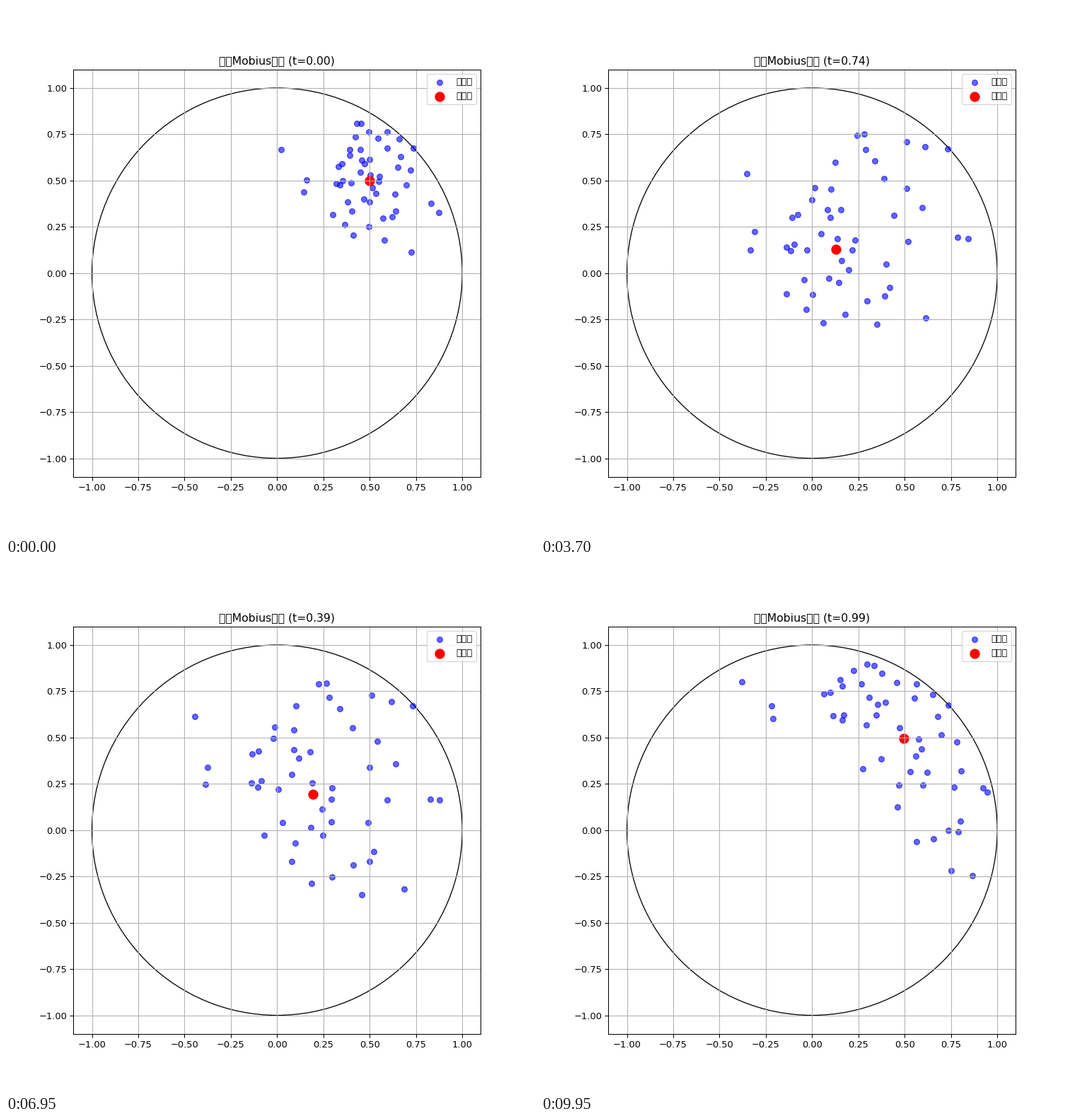
These frames come from a looping animation (748 by 748 pixels, 10 s). A matplotlib script:

```python
import numpy as np
import matplotlib.pyplot as plt
from matplotlib.animation import FuncAnimation

plt.rcParams["font.family"] = ["DejaVu Sans"]

STEPS = 100          # frames per half of the loop
CENTER = 0.5 + 0.5j

# Cloud after its center has been carried to the origin
SPREAD = np.array([
    (-.486, .494), (-.476, .125), (-.500, .014), (-.300, .017), (-.276, -.005),
    (-.253, .033), (-.179, -.005), (-.264, .202), (-.230, .222), (-.141, .314),
    (-.118, .388), (-.022, .380), (.021, .551), (.176, .721), (.222, .729),
    (.217, .633), (.266, .564), (.315, .452), (.478, .692), (.593, .670),
    (.730, .671), (.454, .396), (.548, .282), (.370, .222), (.456, .063),
    (.767, .129), (.835, .135), (.314, -.084), (.339, -.220), (.310, -.274),
    (.198, -.309), (.268, -.433), (.573, -.364), (.065, -.386), (-.062, -.436),
    (-.169, -.359), (-.140, -.271), (-.292, -.261), (-.192, -.184), (-.045, -.179),
    (.021, -.205), (.079, -.128), (.034, -.072), (.100, -.006), (.116, .055),
    (.008, .064), (-.092, .095), (-.049, .249), (-.034, .199), (.033, .250),
]) @ np.array([1, 1j])


def mobius_add(z, b):
    return (z + b) / (1 + np.conj(z) * b)


def mobius_unadd(w, b):
    """Solve mobius_add(z, -b) = w for z."""
    gw, gb = 1 / (1 - abs(w) ** 2), 1 / (1 - abs(b) ** 2)
    return (gw * w + gb * b) / (gw + gb - 1)


def lerp(p, q, t):
    return (1 - t) * p + t * q


def xy(z):
    z = np.atleast_1d(z)
    return np.column_stack([z.real, z.imag])


START = mobius_unadd(SPREAD, CENTER)
END = mobius_add(SPREAD, CENTER)

fig, ax = plt.subplots(figsize=(8, 8), dpi=93.5)
ax.set_xlim(-1.1, 1.1)
ax.set_ylim(-1.1, 1.1)
ax.set_aspect("equal")
ax.grid(True)
ax.add_patch(plt.Circle((0, 0), 1, fill=False, color="black"))

cloud = ax.scatter(START.real, START.imag, c="blue", alpha=0.6, label="离散点")
middle = ax.scatter([0.5], [0.5], c="red", s=100, label="中心点")
ax.legend(loc="upper right")
title = ax.set_title("")


def update(i):
    half, step = divmod(i, STEPS)
    t = step / STEPS
    if half == 0:
        points, center = lerp(START, SPREAD, t), lerp(CENTER, 0, t)
    else:
        points, center = lerp(SPREAD, END, t), lerp(0, CENTER, t)
    cloud.set_offsets(xy(points))
    middle.set_offsets(xy(center))
    title.set_text(f"双曲Mobius变换 (t={t:.2f})")
    return cloud, middle, title


anim = FuncAnimation(fig, update, frames=2 * STEPS, interval=50,
                     repeat=True, repeat_delay=0, blit=False)
plt.show()
```
